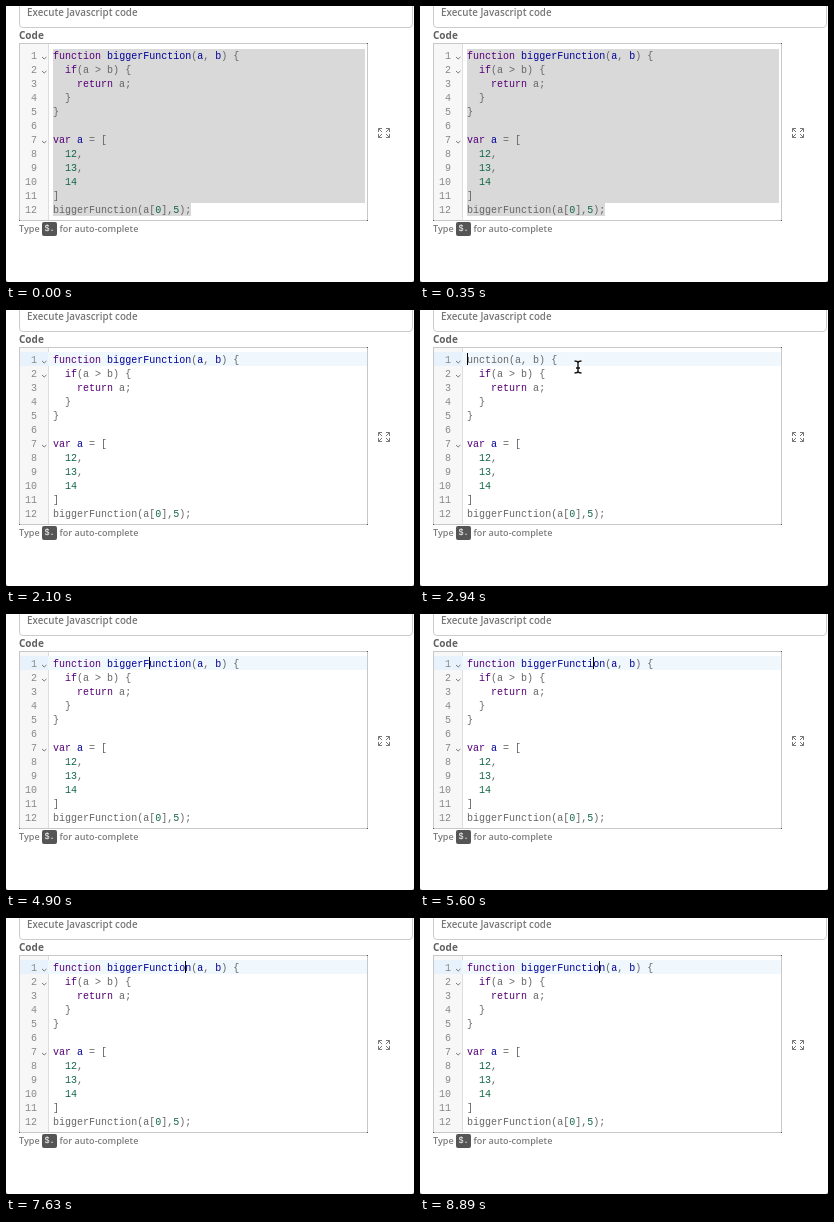
These frames come from a looping animation (408x276 px, 9380 ms). An HTML page:

```html
<!DOCTYPE html>
<html lang="en">
<head>
<meta charset="utf-8">
<style>
  html, body { margin: 0; width: 100%; height: 100%; overflow: hidden; background: #444; }
  body { position: relative; font: 600 9.05px "Open Sans", sans-serif; color: #7d7d7d; }
  body > * { position: absolute; box-sizing: border-box; margin: 0; white-space: pre; }
  .panel { inset: 0; background: #fff; border-radius: 0 0 2px 2px; }
  .field { left: 13px; top: -10px; width: 394px; height: 32px; border: 1px solid #ccc; border-radius: 4px; }
  .title { left: 21px; top: 0; font-size: 9.8px; line-height: 14px; color: #777; }
  .label { left: 13px; top: 22px; font-size: 10px; font-weight: 700; line-height: 14px; color: #606060; }
  .editor { left: 13px; top: 37px; width: 349px; height: 178px; border: 1px solid #c8c8c8; }
  .gutter { left: 14px; top: 38px; width: 29px; height: 176px; background: #f7f7f7; border-right: 1px solid #ddd; }
  .active { left: 14px; width: 347px; height: 14px; background: linear-gradient(90deg, #e8f2fc 28px, #f0f8fe 0); }
  .selection { left: 47px; background: #d9d9d9; }
  .match { width: 6px; height: 13px; background: #bdd3cb; }
  pre { top: 44px; font: 10.02px/14px "Liberation Mono", monospace; color: #666; }
  .numbers { left: 14px; width: 17px; text-align: right; color: #888; }
  .code { left: 47px; }
  .code b { color: #507; font-weight: 400; }
  .code i { color: #009; font-style: normal; }
  .code u { color: #164; text-decoration: none; }
  .caret { width: 1px; height: 12px; background: #000; }
  .hint { top: 216px; line-height: 14px; }
  .key { left: 36px; top: 216px; width: 15px; height: 14px; border-radius: 2px; background: #555; color: #fff;
         font: 8.5px/14px "Liberation Mono", monospace; text-align: center; }
  svg { left: 0; top: 0; fill: none; }
</style>
</head>
<body>
<div class="panel"></div>
<div class="field"></div>
<div class="title">Execute Javascript code</div>
<div class="label">Code</div>
<div class="editor"></div>
<div class="gutter"></div>
<div class="active" id="active"></div>
<div class="selection" style="top:43px;width:312px;height:154px"></div>
<div class="selection" style="top:197px;width:138px;height:13px"></div>
<div class="match" style="left:119px;top:57px"></div>
<div class="match" style="left:59px;top:85px"></div>
<pre class="numbers" id="numbers"></pre>
<pre class="code"><span id="head"></span>
  <b>if</b>(a &gt; b) {
    <b>return</b> a;
  }
}

<b>var</b> <i>a</i> = [
  <u>12</u>,
  <u>13</u>,
  <u>14</u>
]
biggerFunction(a[<u>0</u>],<u>5</u>);</pre>
<div class="caret" id="caret"></div>
<div class="hint" style="left:13px">Type</div>
<div class="key">$.</div>
<div class="hint" style="left:53.5px">for auto-complete</div>
<svg width="408" height="276">
  <path stroke="#555" d="M361 37.5h1M361 214.5h1M13 214.5h1"/>
  <path stroke="#777" d="M36 51l2.2 2 2.2-2M36 65l2.2 2 2.2-2M36 135l2.2 2 2.2-2"/>
  <path stroke="#777" d="M376 122.5h-3.5v3.5m0-3.5l3.5 3.5M380 122.5h3.5v3.5m0-3.5l-3.5 3.5M376 131.5h-3.5v-3.5m0 3.5l3.5-3.5M380 131.5h3.5v-3.5m0 3.5l-3.5-3.5"/>
  <defs><path id="beam" d="M-3.5-6q3 0 3.5 1.5Q.5-6 3.5-6M0-4.5v9M-3.5 6q3 0 3.5-1.5Q.5 6 3.5 6M-2 1h4"/></defs>
  <g id="mouse">
    <use href="#beam" stroke="#fff" stroke-width="3"/>
    <use href="#beam" stroke="#111" stroke-width="1.4"/>
  </g>
</svg>
<script>
const LOOP = 9380, CHAR = 6.013, LINE = 14, LEFT = 46.6, TOP = 43;
const firstLine = 'function biggerFunction(a, b) {';
const coloredLine = '<b>function</b> <i>biggerFunction</i>(<i>a</i>, <i>b</i>) {';

// [start time, caret column]
const moves = [[910, 13], [1330, 16], [2870, 0], [4340, 16], [4970, 17], [5110, 18],
  [5250, 19], [5460, 20], [5600, 21], [5740, 22], [6440, 0], [7630, 22]];
const blinks = [[2100, 2730], [3500, 4130], [7070, 7630], [8260, 8890]];
// [start, end, characters deleted from the first line]
const cuts = [[2870, 4340, 16], [6440, 7630, 22]];
// [start, end, x, y]
const pointers = [[2380, 4900, 158, 57], [8330, 8400, 165, 57.5]];

const $ = id => document.getElementById(id);
const all = selector => document.querySelectorAll(selector);
const at = (spans, t) => spans.find(([start, end]) => t >= start && t < end);
const show = (el, on) => { el.style.visibility = on ? 'visible' : 'hidden'; };

$('numbers').textContent = Array.from({ length: 12 }, (_, i) => i + 1).join('\n');

let shownCut = -1;
function draw(t) {
  const selected = t < 910;
  const row = t < 1330 ? 1 : 0;
  const column = moves.reduce((col, [start, next]) => t >= start ? next : col, 0);

  all('.selection').forEach(el => show(el, selected));
  all('.match').forEach(el => show(el, !selected && row === 1));

  show($('active'), !selected);
  $('active').style.top = TOP - 1 + row * LINE + 'px';

  show($('caret'), !selected && !at(blinks, t));
  $('caret').style.left = LEFT + column * CHAR + 'px';
  $('caret').style.top = TOP + row * LINE + 'px';

  const cut = (at(cuts, t) || [0, 0, 0])[2];
  if (cut !== shownCut) {
    $('head').innerHTML = cut ? firstLine.slice(cut) : coloredLine;
    shownCut = cut;
  }

  const pointer = at(pointers, t);
  show($('mouse'), pointer);
  if (pointer) $('mouse').setAttribute('transform', `translate(${pointer[2]} ${pointer[3]})`);
}

function tick() {
  draw(performance.now() % LOOP);
  requestAnimationFrame(tick);
}
tick();
</script>
</body>
</html>
```
